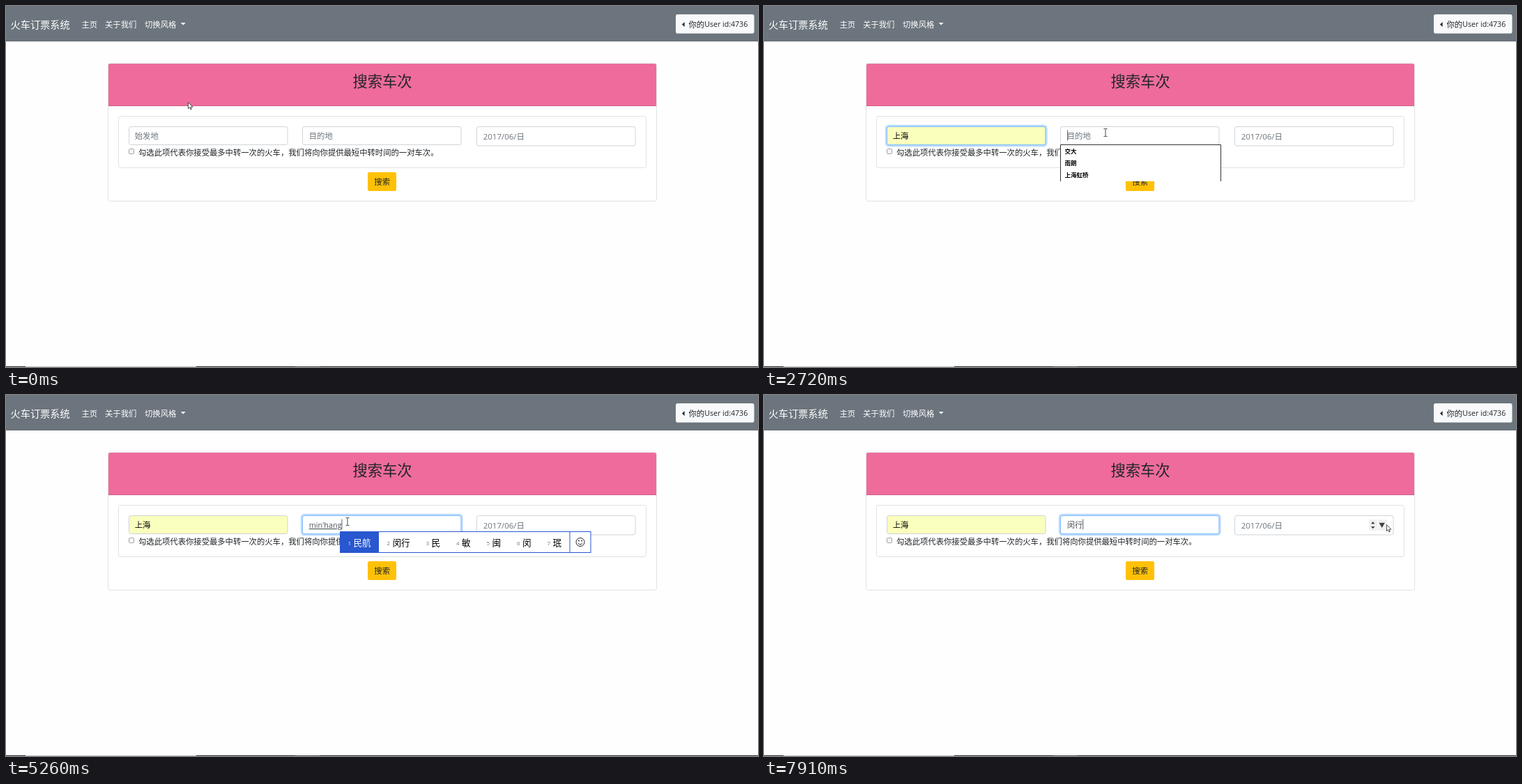
Animation of 1079x519 px, one loop 8000 ms. Source, as an HTML page:

```html
<!DOCTYPE html>
<html lang="zh-CN">
<head>
<meta charset="utf-8">
<title>火车订票系统</title>
<style>
html, body { margin: 0; width: 100%; height: 100%; overflow: hidden; background: #fefefe; }
svg { display: block; width: 1079px; height: 519px; font-family: "Open Sans", "Noto Sans CJK SC", "Noto Sans CJK", sans-serif; }
text { white-space: pre; }
</style>
</head>
<body>
<svg id="stage" viewBox="0 0 1079 519"></svg>
<script>
const LOOP = 8000;
const BLUE = '#2857cf';
const stage = document.getElementById('stage');

// Last row of a [time, ...values] table whose time has been reached
const at = (table, t) => table.reduce((hit, row) => (row[0] <= t ? row : hit), table[0]);
const within = (t, ...spans) => spans.some(([a, b]) => t >= a && t < b);

const rect = (x, y, w, h, fill, extra = '') =>
  `<rect x="${x}" y="${y}" width="${w}" height="${h}" fill="${fill}" ${extra}/>`;
const path = (d, fill, extra = '') => `<path d="${d}" fill="${fill}" ${extra}/>`;
// Text placed by the vertical centre of its glyphs
const text = (x, cy, size, str, fill = '#212529', extra = '') =>
  `<text x="${x}" y="${cy + size * 0.37}" font-size="${size}" fill="${fill}" ${extra}>${str}</text>`;

const BODY = 11.36;

const pointer = [
  [0, 261, 138], [690, 257, 146], [760, 249, 164], [840, 244, 182, 'beam'],
  [1540, 241, 191, 'beam'], [1620, 233, 205], [1700, 225, 220], [1780, 222, 225],
  [1990, 223, 224], [2070, 262, 213], [2150, 338, 200], [2230, 425, 193, 'beam'],
  [2310, 487, 188, 'beam'], [2480, 488, 186, 'beam'], [2550, 490, 182, 'beam'],
  [7050, 493, 182, 'beam'], [7130, 512, 183, 'beam'], [7200, 548, 185, 'beam'],
  [7280, 600, 187, 'beam'], [7360, 662, 190], [7440, 726, 193], [7510, 792, 196],
  [7590, 852, 198], [7670, 900, 198], [7740, 917, 194], [7820, 893, 186]
];
const focusFrom = [[0, 0], [1240, 0.3], [1310, 0.7], [1390, 1], [2790, 0.5], [2870, 0]];
const focusTo = [[0, 0], [2790, 0.5], [2870, 1]];
const fromValue = [[0, ''], [1620, 'a'], [1700, '上海']];

const typed = [
  [4650, 'm', 445, '没 吗 嘛 么 们 每 某'],
  [4730, 'mi', 448, '米 密 迷 秘 蜜 觅 弥'],
  [4810, 'min', 453, '民 敏 闽 闵 珉 悯 皿'],
  [4970, "min'h", 463, '民航 闵行 民会 民 敏 闽 闵'],
  [5040, "min'ha", 469, '民航 闵行 民哈 民 敏 闽 闵'],
  [5120, "min'han", 475, '民航 闵行 闽韩 悯寒 敏汉 民 闽'],
  [5190, "min'hang", 482, '民航 闵行 闽韩 悯寒 敏汉 民 闽'],
  [5260, "min'hang", 482, '民航 闵行 民 敏 闽 闵 珉']
];

function field(x, h, fill = '#fff', focus = 0) {
  const halo = focus && rect(x - 1, 172, 230.4, h + 3, 'none',
    `rx="4" stroke="#007bff" stroke-width="2.4" stroke-opacity="${0.27 * focus}"`);
  const border = rect(x + 0.5, 173.5, 227.5, h, fill, 'rx="2.8" stroke="#ced4da"');
  const glow = focus && rect(x + 0.5, 173.5, 227.5, h, 'none',
    `rx="2.8" stroke="#80bdff" stroke-opacity="${focus}"`);
  return (halo || '') + border + (glow || '');
}

const caret = x => rect(x, 178.5, 0.9, 15, '#495057');

function dropdown(x, bottom, items, hover = -1) {
  return rect(x, 199, 231, bottom - 199, '#fff') +
    (hover < 0 ? '' : rect(x + 1, 200 + hover * 17, 229, 17, '#c0dcf5')) +
    path(`M${x + 0.5} ${bottom}V199.5H${x + 230.5}V${bottom}`, 'none', 'stroke="#333"') +
    items.map((s, i) => text(x + 6.5, 209 + i * 17, 8.5, s, '#000', 'font-weight="700"')).join('');
}

function candidates(x, words) {
  let pos = x, cells = '';
  words.split(' ').forEach((word, i) => {
    const w = 31 + 12.5 * word.length;
    if (!i) cells += rect(x, 196, w, 31, BLUE);
    cells += text(pos + 11.5, 213.5, 8, i + 1, i ? '#777' : '#fff') +
      text(pos + 19.5, 212, 12.6, word, i ? '#000' : '#fff');
    pos += w;
  });
  const face = `<g transform="translate(${pos + 15.5} 211.5)" fill="none" stroke="#222">
    <circle r="6"/><path d="M-3.3 1.5Q0 5.3 3.3 1.5"/></g>` +
    `<circle cx="${pos + 13.4}" cy="209.6" r=".9"/><circle cx="${pos + 17.6}" cy="209.6" r=".9"/>`;
  return rect(x + 0.5, 196.5, pos + 30 - x, 30, '#fff', `stroke="${BLUE}"`) + cells +
    path(`M${pos + 0.5} 196V227`, 'none', `stroke="${BLUE}"`) + face;
}

function languages(selected) {
  return rect(872, 194, 207, 93, '#1f1f1f') +
    rect(872, selected ? 241 : 197, 207, 43, BLUE) +
    rect(886, 208, 14, 14, '#fff') +
    text(924.5, 212, 10.4, '中文(简体，中国)', '#fff') +
    text(924.5, 226.5, 10.4, '青砾拼音', '#fff') +
    text(880.5, 255, 11.8, 'ENG', '#fff', 'font-weight="600"') +
    text(924.5, 255, 10.4, '英语(美国)', '#fff') +
    text(924.5, 269.5, 10.4, '美式键盘 键盘', '#fff');
}

const spinner =
  rect(868, 179, 12, 16, '#f0f0f0') + rect(881, 179, 13, 16, '#f0f0f0') +
  path('M871 185.3L873.7 182L876.4 185.3ZM871 189L873.7 192.2L876.4 189ZM882.6 183.8H890.8L886.7 191Z', '#3c4043');

function mouse([, x, y, kind]) {
  const shape = kind
    ? path('M-2.5 -5.5H-.7L0 -5L.7 -5.5H2.5M0 -5V5M-2.5 5.5H-.7L0 5L.7 5.5H2.5', 'none', 'stroke="#333" stroke-width=".9"')
    : path('M.4 .5V9.6L2.5 7.7L4 11L5.3 10.4L3.9 7.2H6.9Z', '#fff', 'stroke="#222" stroke-width=".8" stroke-linejoin="round"');
  return `<g transform="translate(${x} ${y})">${shape}</g>`;
}

const page =
  rect(0, 0, 1079, 519, '#fefefe') +
  rect(0, 0, 1079, 51, '#6c757d') +
  text(6.5, 27, 14.2, '火车订票系统', '#fff') +
  text(108.5, 26.5, BODY, '主页', '#fff') +
  text(142, 26.5, BODY, '关于我们', '#fff') +
  text(199, 26.5, BODY, '切换风格', '#fff') +
  path('M250.8 24H257.6L254.2 27.4Z', '#fff') +
  rect(961, 12, 112.5, 27.5, '#f8f9fa', 'rx="2.8"') +
  path('M973.6 23V30L970 26.5Z', '#212529') +
  text(979.5, 26.5, BODY, '你的') + text(1002.2, 26.5, 10.6, 'User id:4736') +
  rect(146.5, 82.5, 787, 198, '#fff', 'rx="2.8" stroke="#dfe3e3"') +
  path('M147 144V85Q147 83 149 83H931Q933 83 933 85V144Z', '#ee6b9b') +
  path('M147 143.5H933', 'none', 'stroke="#d0608a"') +
  text(540, 108.5, 21.3, '搜索车次', '#212529', 'text-anchor="middle"') +
  rect(161.5, 158.5, 757, 74, '#fff', 'rx="2.8" stroke="#dfe3e3"') +
  rect(176.5, 205.5, 7, 7, '#f6f6f6', 'rx="1" stroke="#a0a0a0"') +
  text(190, 210.8, 11.34, '勾选此项代表你接受最多中转一次的火车，我们将向你提供最短中转时间的一对车次。') +
  rect(519, 239, 41, 27, '#ffc107', 'rx="2.8"') +
  text(528.3, 253, BODY, '搜索') +
  rect(0, 518, 1079, 1, '#2b2b2b') + rect(28, 518, 245, 1, '#c4c4c4') + rect(415, 518, 35, 1, '#555');

function scene(t) {
  const spot = at(pointer, t);
  const start = at(fromValue, t)[1];
  const composing = within(t, [4650, 5810]);
  const [, word, caretX, words] = at(typed, t);
  const onDate = spot[1] >= 675 && spot[1] < 904;

  let out = page +
    field(176, 26, start ? '#faffbd' : '#fff', at(focusFrom, t)[1]) +
    field(425, 26, '#fff', at(focusTo, t)[1]) +
    field(675, 27.5) +
    text(184.7, 187, BODY, start || '始发地', start ? '#000' : '#6c757d') +
    text(684.7, 187.5, 11.5, '2017/06/日', '#6c757d');

  if (composing) out += text(434.7, 187, 10.8, word, '#495057', 'text-decoration="underline"');
  else out += text(434.7, 187, BODY, t < 5810 ? '目的地' : '闵行', t < 5810 ? '#6c757d' : '#495057');

  if (onDate) out += spinner;
  if (within(t, [1240, 1540])) out += caret(185);
  if (within(t, [1990, 2480])) out += caret(207.5);
  if (within(t, [2720, 3250], [3800, 4270])) out += caret(435);
  if (composing) out += caret(caretX - 0.5);
  if (within(t, [5810, 6360], [6820, 7360], [7910, LOOP])) out += caret(457.3);

  if (within(t, [1240, 1990])) {
    out += dropdown(175, 286, ['a', '上海', '北京南', '小榄', '广州南'], t < 1620 ? -1 : t < 1700 ? 0 : 1);
  }
  if (within(t, [2720, 4650])) out += dropdown(425, 252, ['交大', '南朗', '上海虹桥']);
  if (composing) out += candidates(caretX - 3, words);
  if (within(t, [4110, 4270])) out += languages(0);
  if (within(t, [6210, 6360])) out += languages(1);
  return out + mouse(spot);
}

const began = performance.now();
let shown = '';
function tick() {
  const next = scene((performance.now() - began) % LOOP);
  if (next !== shown) stage.innerHTML = shown = next;
  requestAnimationFrame(tick);
}
tick();
</script>
</body>
</html>
```
